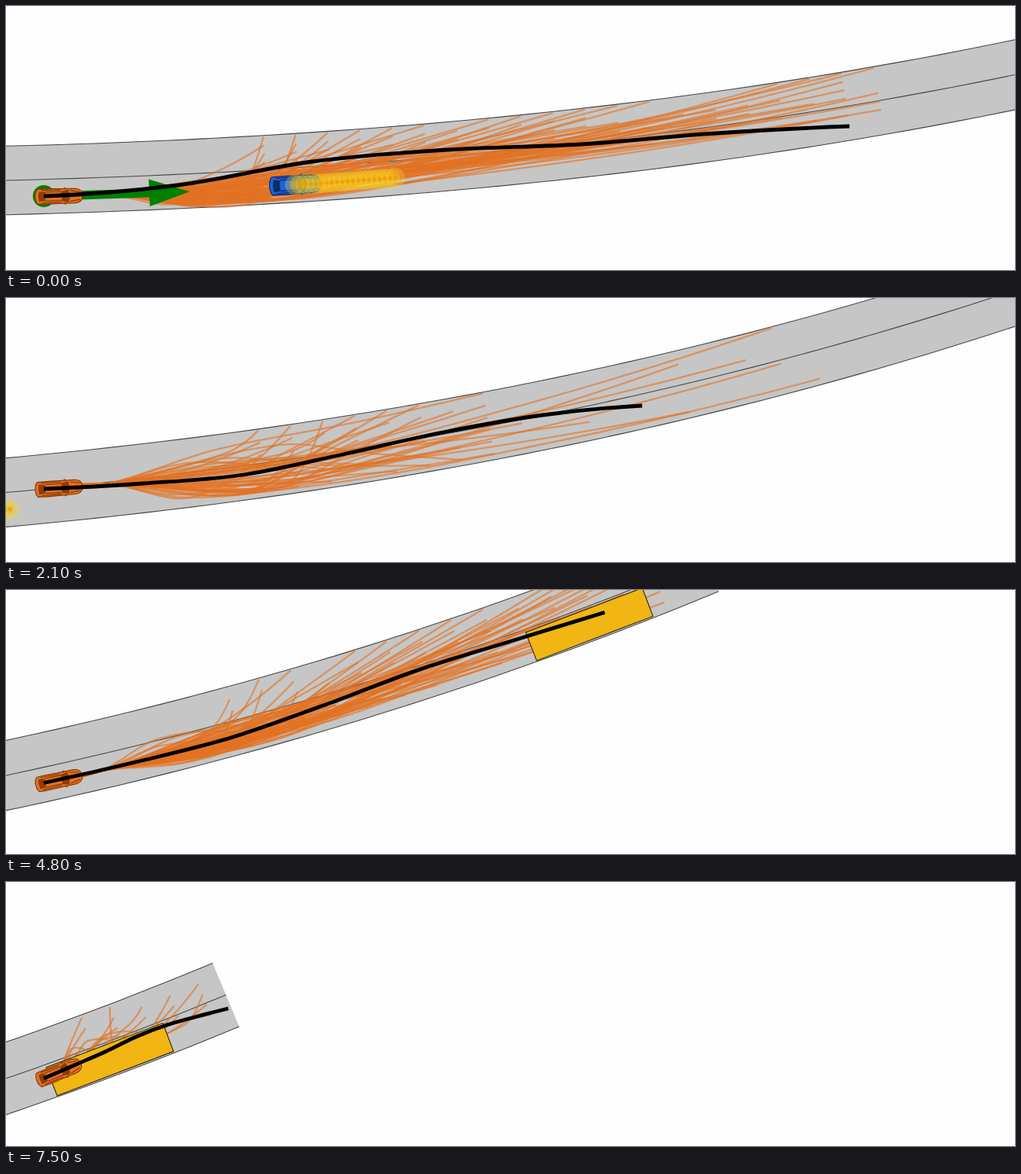
Recreate the animation shown at these times as an HTML page. Size 1280 by 336 pixels, loop 7600 ms.

```html
<!DOCTYPE html>
<html lang="en">
<head>
<meta charset="utf-8">
<title>Trajectory planning on a curved road</title>
<style>
html, body { margin: 0; width: 100%; height: 100%; overflow: hidden; background: #fefefe; }
svg { display: block; width: 100vw; height: 100vh; }
</style>
</head>
<body>
<svg viewBox="0 0 1280 336" preserveAspectRatio="xMinYMin slice">
  <defs>
    <radialGradient id="glow">
      <stop offset="0" stop-color="#f7ac08" stop-opacity=".5"/>
      <stop offset=".45" stop-color="#f6c414" stop-opacity=".4"/>
      <stop offset="1" stop-color="#f4e32a" stop-opacity=".27"/>
    </radialGradient>
    <g id="car" stroke-width="1.1">
      <path d="M-27 -9.3Q-16 -10 0 -9.4L21 -9.2Q28 -8.4 29.5 -4Q30.5 0 29.5 4Q28 8.4 21 9.2L0 9.4Q-16 10 -27 9.3Q-30 6 -30 0Q-30 -6 -27 -9.3Z"/>
      <path class="glass" d="M-25 -6.5L-17 -5.5Q-18.5 0 -17 5.5L-25 6.5Q-27 0 -25 -6.5Z"/>
      <path class="glass" d="M3 -6L12 -8.2Q16 0 12 8.2L3 6Q5.5 0 3 -6Z"/>
      <path fill="none" d="M-17 -5.6H3M-17 5.6H3M-22 -8L3 -7.6M-22 8L3 7.6M14 -7L27 -4.8M14 7L27 4.8"/>
      <path class="glass" d="M6 -9L8 -11.3L10 -9ZM6 9L8 11.3L10 9Z"/>
    </g>
  </defs>
  <g id="world">
    <path id="road" fill="#c6c6c6"/>
    <path id="edges" fill="none" stroke="#484848" stroke-width="1.1"/>
    <g id="fan" fill="none" stroke="#e37222" stroke-width="2.3" stroke-opacity=".6"/>
    <path d="M1965 -322L2113 -378.5L2126.5 -342.5L1979 -286Z" fill="#f1b514" stroke="#2b2410" stroke-width="1.1"/>
    <g fill="#008000">
      <circle cx="48" cy="20" r="14"/>
      <path d="M48 14.5L181.6 10.4L181 -1.5L233 14.2L182.6 33L182 21.6L48 26Z"/>
    </g>
    <g id="blue" fill="#1f62e2" stroke="#0b2a62" style="--glass:#0a2f66"><use href="#car"/></g>
    <g id="discs" fill="url(#glow)"/>
    <g id="dots" fill="#f09a08" fill-opacity=".75"/>
  </g>
  <g id="ego" fill="#e37222" stroke="#853500" style="--glass:#8f3c04"><use href="#car"/></g>
  <path id="plan" fill="none" stroke="#000" stroke-width="4.8"/>
</svg>
<style>.glass { fill: var(--glass); stroke: none; }</style>
<script>
const $ = id => document.getElementById(id);
const LOOP = 7600, STEP = 100, ROAD_END = 2193, HALF = 43.7, REAR = 48;
const times = [0, 900, 2100, 2900, 4100, 5500, 7500];

// camera x, lane divider height at the left edge, heading in degrees
const pose = [
  [0, 222, -1.5], [240, 241, -4.5], [580, 247.5, -4.5], [790, 238.5, -5],
  [1107, 234.5, -9.5], [1493, 239, -14.5], [1914, 250, -22]
];
// end x of the plan, then heights at seven even steps
const plans = [
  [1070, 242, 228, 198, 183, 176, 162, 153],
  [928, 244, 233.5, 227, 218, 203, 182, 158],
  [807, 243, 236, 225, 199, 171, 149, 137],
  [767, 243, 230, 212, 186, 160, 136, 111],
  [834, 245, 219, 189, 149, 105, 66, 23],
  [685, 246, 218, 187, 144, 99, 64, 34],
  [282, 250, 233, 216, 197, 182, 171, 161]
];
// first end, end of dense part, last end, odds in both parts,
// range of offsets on the way, range of offsets at the end
const fans = [
  [329, 870, 1108, .8, .55, 4, 40, -42, 12],
  [364, 900, 1190, .75, .3, -32, 20, -40, 35],
  [326, 640, 1147, .8, .14, -27, 36, -42, 36],
  [310, 960, 1083, .8, .5, 2, 39, -42, 30],
  [305, 880, 960, .8, .6, 2, 39, -42, 25],
  [277, 640, 690, .75, .5, -6, 36, -42, 36],
  [110, 262, 287, .7, .6, -22, 22, -40, 30]
];

const lerp = (a, b, u) => a + (b - a) * u;
const roadY = x => -(0.025 * x + 0.454e-4 * x * x + 1.34e-8 * x ** 3);
const slope = x => -(0.025 + 0.908e-4 * x + 4.02e-8 * x * x);
const f = n => n.toFixed(1);

function at(x, d) {
  const s = slope(x), n = Math.hypot(1, s);
  return [x - d * s / n, roadY(x) + d / n];
}

function tangents(xs, ys) {
  const n = xs.length, m = [];
  const chord = i => (ys[i + 1] - ys[i]) / (xs[i + 1] - xs[i]);
  for (let i = 1; i < n - 1; i++) m[i] = (ys[i + 1] - ys[i - 1]) / (xs[i + 1] - xs[i - 1]);
  m[0] = 2 * chord(0) - m[1];
  m[n - 1] = 2 * chord(n - 2) - m[n - 2];
  return m;
}

function curve(pts) {
  const xs = pts.map(p => p[0]), ys = pts.map(p => p[1]), m = tangents(xs, ys);
  let d = `M${f(xs[0])} ${f(ys[0])}`;
  for (let i = 1; i < pts.length; i++) {
    const h = (xs[i] - xs[i - 1]) / 3;
    d += `C${f(xs[i - 1] + h)} ${f(ys[i - 1] + h * m[i - 1])} ` +
         `${f(xs[i] - h)} ${f(ys[i] - h * m[i])} ${f(xs[i])} ${f(ys[i])}`;
  }
  return d;
}

// smooth value of every column at time t
function sample(rows, t, smooth) {
  let i = 0;
  while (i < times.length - 2 && t >= times[i + 1]) i++;
  const w = times[i + 1] - times[i], u = (t - times[i]) / w;
  return rows[i].map((a, c) => {
    const b = rows[i + 1][c];
    if (!smooth) return lerp(a, b, u);
    const m = tangents(times, rows.map(r => r[c]));
    const v = 1 - u;
    return a * v * v * (1 + 2 * u) + b * u * u * (3 - 2 * u) + w * u * v * (m[i] * v - m[i + 1] * u);
  });
}

function random(seed) {
  return () => {
    seed = seed + 0x6D2B79F5 | 0;
    let r = Math.imul(seed ^ seed >>> 15, 1 | seed);
    r = r + Math.imul(r ^ r >>> 7, 61 | r) ^ r;
    return ((r ^ r >>> 14) >>> 0) / 4294967296;
  };
}

function add(parent, tag, attrs) {
  const el = document.createElementNS("http://www.w3.org/2000/svg", tag);
  for (const k in attrs) el.setAttribute(k, attrs[k]);
  return parent.appendChild(el);
}

function drawRoad() {
  const side = d => {
    const pts = [];
    for (let x = -60; x < ROAD_END; x += 30) pts.push(at(x, d));
    pts.push(at(ROAD_END, d));
    return pts;
  };
  const line = pts => "M" + pts.map(p => p.map(f).join(" ")).join("L");
  const [top, mid, low] = [-HALF, 0, HALF].map(side);
  $("edges").setAttribute("d", line(top) + line(mid) + line(low));
  $("road").setAttribute("d", line([...top, ...low.reverse()]) + "Z");
}

function fanPaths(t, cam, startY, heading) {
  const [first, split, last, keep, rare, wayLo, wayHi, endLo, endHi] = sample(fans, t);
  const rnd = random(t + 17), paths = [];
  const tan = Math.tan(heading * Math.PI / 180);
  const x0 = cam + REAR;
  for (let x = first; x <= last + 2; x += t > 6500 ? 36 : 41) {
    for (let j = 0; j < 6; j++) {
      const odds = rnd(), r = rnd(), q = rnd(), hook = rnd();
      if (odds > (x <= split ? keep : rare)) continue;
      const len = x - REAR, k = Math.min(80, len * .3);
      const end = lerp(endLo, endHi, j / 5);
      const way = lerp(wayHi, wayLo, r ** 1.5);
      const short = len < 380 && end < 0 && hook < .45;
      const turn = short ? len * .84 : Math.min(len * .6, 190 + q * 150);
      const pts = [[x0, startY], [x0 + k, startY + k * tan], at(x0 + turn, way)];
      if (len - turn > 150) pts.push(at(x0 + (turn + len) / 2, (way + end) / 2));
      pts.push(at(x0 + len, end));
      paths.push(curve(pts));
    }
  }
  return paths;
}

drawRoad();
const pool = Array.from({ length: 160 }, () => add($("fan"), "path"));
const discs = Array.from({ length: 20 }, () => add($("discs"), "circle", { r: 12.5 }));
const dots = Array.from({ length: 20 }, () => add($("dots"), "circle", { r: 2.6 }));

function drawBlue(t) {
  const x = 365 + t * .0433, [bx, by] = at(x, 21.5);
  const deg = Math.atan(slope(x)) * 180 / Math.PI;
  $("blue").setAttribute("transform", `translate(${f(bx)} ${f(by)}) rotate(${f(deg)}) scale(1.07 1.22)`);
  discs.forEach((disc, i) => {
    const [cx, cy] = at(x + i * 6.7, 21.5);
    for (const c of [disc, dots[i]]) {
      c.setAttribute("cx", f(cx));
      c.setAttribute("cy", f(cy));
    }
  });
}

function draw(t) {
  const [cam, mid, heading] = sample(pose, t, true);
  const [endX, ...ys] = sample(plans, t);
  const dy = mid - roadY(cam);
  $("world").setAttribute("transform", `translate(${f(-cam)} ${f(dy)})`);
  $("ego").setAttribute("transform", `translate(67 242) rotate(${f(heading)})`);
  $("plan").setAttribute("d", curve(ys.map((y, i) => [lerp(REAR, endX, i / 6), y])));
  const paths = fanPaths(t, cam, ys[0] - dy, heading);
  pool.forEach((p, i) => p.setAttribute("d", paths[i] || ""));
  drawBlue(t);
}

let shown = -1;
function tick() {
  const t = Math.floor(performance.now() % LOOP / STEP) * STEP;
  if (t !== shown) draw(shown = t);
  requestAnimationFrame(tick);
}
tick();
</script>
</body>
</html>
```
